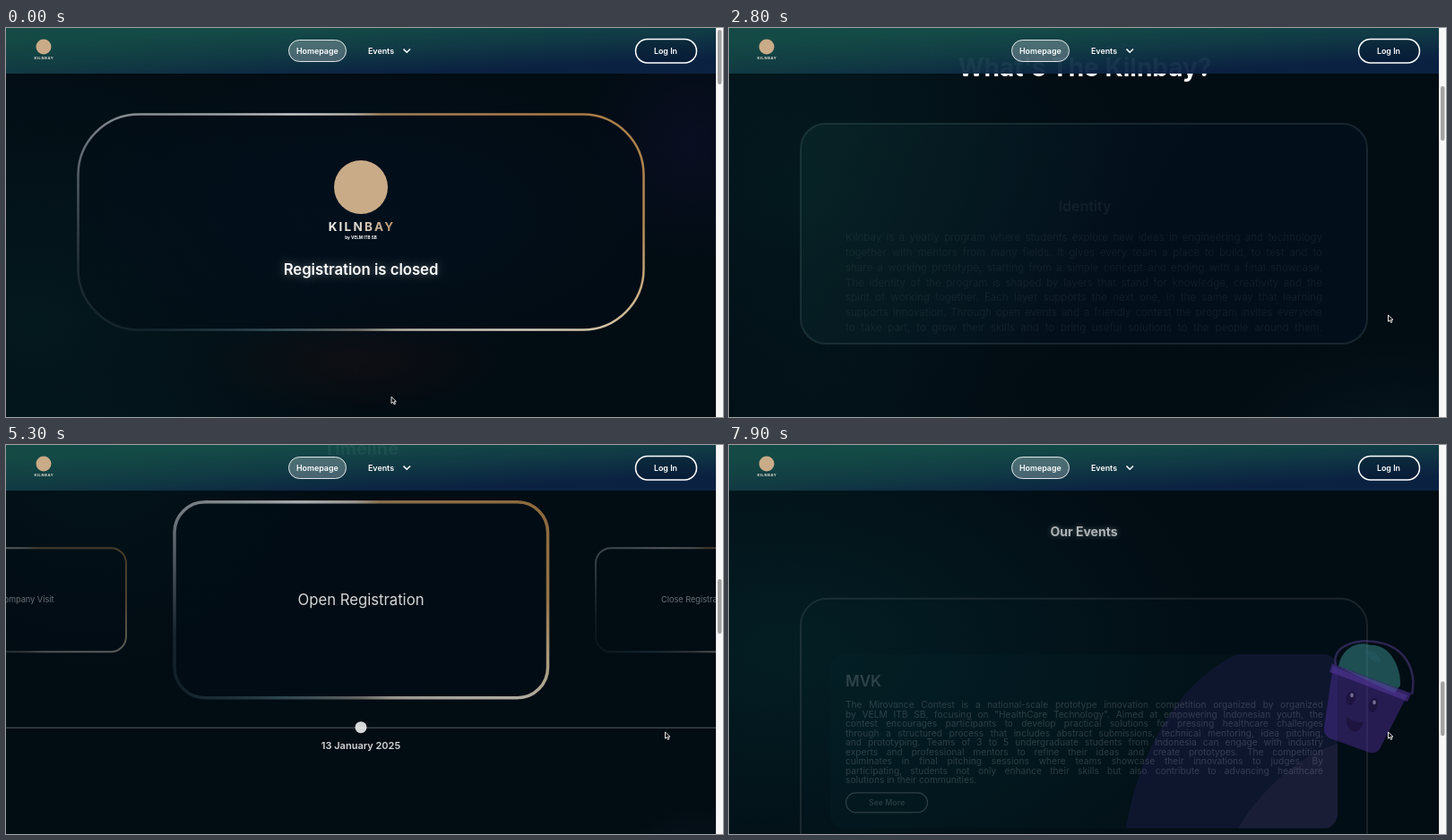
Animation, 800 px wide and 435 px high, one loop 8 s. Source, as an HTML page with a canvas:

```html
<!DOCTYPE html>
<html lang="en">
<head>
<meta charset="utf-8">
<title>Kilnbay</title>
<style>
html, body { margin: 0; width: 100%; height: 100%; overflow: hidden; background: #020c13; }
canvas { display: block; width: 800px; height: 435px; }
</style>
</head>
<body>
<canvas id="stage" width="800" height="435"></canvas>
<script>
const ctx = document.getElementById('stage').getContext('2d');
const LOOP = 8000, STEP = 100, PAGE_W = 792, MID = 396;
const GOLD = '#c9ab88', WHITE = '#fff';

// [time, scroll offset]
const SCROLL = [[0, 0], [200, 5], [1200, 85.5], [2000, 250], [2800, 447], [3400, 520], [4400, 810],
  [5200, 1040], [6000, 1108], [6600, 1512], [7000, 1575], [7700, 1855], [8000, 1862]];

const clamp = (v, a = 0, b = 1) => Math.min(b, Math.max(a, v));
const fade = (t, a, b) => clamp((t - a) / (b - a));
const ease = p => p * p * (3 - 2 * p);

// Monotone cubic through the scroll points
const slope = i => (SCROLL[i + 1][1] - SCROLL[i][1]) / (SCROLL[i + 1][0] - SCROLL[i][0]);
function tangent(i) {
  if (i === 0 || i === SCROLL.length - 1) return 0;
  const a = slope(i - 1), b = slope(i);
  return a * b > 0 ? 2 * a * b / (a + b) : 0;
}
function scrollAt(t) {
  let i = 0;
  while (i < SCROLL.length - 2 && t >= SCROLL[i + 1][0]) i++;
  const [t0, s0] = SCROLL[i], [t1, s1] = SCROLL[i + 1];
  const d = t1 - t0, u = (t - t0) / d, v = 1 - u;
  return s0 * (1 + 2 * u) * v * v + s1 * u * u * (3 - 2 * u) +
    d * (tangent(i) * u * v * v - tangent(i + 1) * u * u * v);
}

function group(alpha, draw) {
  if (alpha <= 0) return;
  ctx.save();
  ctx.globalAlpha *= alpha;
  draw();
  ctx.restore();
}
function text(s, x, y, size, weight = 600, color = WHITE, align = 'center', spacing = 0) {
  ctx.font = `${weight} ${size}px Inter, "Open Sans", sans-serif`;
  ctx.letterSpacing = spacing + 'px';
  ctx.textAlign = align;
  ctx.fillStyle = color;
  ctx.fillText(s, x, y + size * 0.36);
  ctx.letterSpacing = '0px';
}
function justify(s, x, y, w, size, weight, color) {
  ctx.font = `${weight} ${size}px Inter, "Open Sans", sans-serif`;
  const words = s.split(' ');
  const used = words.reduce((sum, word) => sum + ctx.measureText(word).width, 0);
  const gap = (w - used) / (words.length - 1);
  for (const word of words) {
    text(word, x, y, size, weight, color, 'left');
    x += ctx.measureText(word).width + gap;
  }
}
function box(x, y, w, h, r, fill, stroke, lw = 1) {
  ctx.beginPath();
  ctx.roundRect(x, y, w, h, r);
  if (fill) { ctx.fillStyle = fill; ctx.fill(); }
  if (stroke) { ctx.strokeStyle = stroke; ctx.lineWidth = lw; ctx.stroke(); }
}
function rect(x, y, w, h, color) {
  ctx.fillStyle = color;
  ctx.fillRect(x, y, w, h);
}
function oval(x, y, rx, ry, color, turn = 0) {
  ctx.beginPath();
  ctx.ellipse(x, y, rx, ry, turn, 0, 7);
  ctx.fillStyle = color;
  ctx.fill();
}
function path(d, fill, stroke, lw = 1) {
  const p = new Path2D(d);
  if (fill) { ctx.fillStyle = fill; ctx.fill(p); }
  if (stroke) { ctx.strokeStyle = stroke; ctx.lineWidth = lw; ctx.stroke(p); }
}
function linear(x0, y0, x1, y1, ...colors) {
  const g = ctx.createLinearGradient(x0, y0, x1, y1);
  colors.forEach((c, i) => g.addColorStop(i / (colors.length - 1), c));
  return g;
}
function glow(x, y, rx, ry, rgb, alpha) {
  ctx.save();
  ctx.translate(x, y);
  ctx.scale(1, ry / rx);
  const g = ctx.createRadialGradient(0, 0, 0, 0, 0, rx);
  g.addColorStop(0, `rgba(${rgb},${alpha})`);
  g.addColorStop(1, `rgba(${rgb},0)`);
  ctx.fillStyle = g;
  ctx.fillRect(-rx, -rx, rx * 2, rx * 2);
  ctx.restore();
}
function metalCard(x, y, w, h, r, lw) {
  const g = ctx.createConicGradient(0, x + w / 2, y + h / 2);
  [[0, '#b28a54'], [0.05, '#cdb891'], [0.09, '#d2cdbf'], [0.2, '#b5b1a6'], [0.25, '#77756f'],
    [0.36, '#35505b'], [0.43, '#14232b'], [0.47, '#1d2a32'], [0.52, '#4e5860'], [0.57, '#858d92'],
    [0.66, '#c6cbcc'], [0.74, '#b5b0a6'], [0.78, '#a08159'], [0.93, '#a87c46'], [1, '#b28a54']]
    .forEach(([p, c]) => g.addColorStop(p, c));
  box(x, y, w, h, r, 'rgba(2,12,22,.5)', g, lw);
}

function background() {
  rect(0, 0, 800, 1900 + 435, '#020c13');
  glow(30, 330, 380, 330, '6,40,42', 0.45);
  glow(390, 372, 170, 60, '38,18,18', 0.35);
  glow(765, 130, 120, 130, '20,16,52', 0.45);
  glow(396, 210, 340, 160, '5,26,46', 0.6);
  glow(80, 640, 380, 260, '5,42,44', 0.4);
  glow(740, 930, 190, 130, '12,40,46', 0.4);
  glow(100, 1000, 260, 300, '5,36,40', 0.4);
  glow(770, 1545, 90, 90, '18,38,48', 0.5);
  glow(790, 1720, 110, 150, '18,24,56', 0.45);
  glow(40, 1760, 300, 200, '5,36,38', 0.35);
  glow(60, 2090, 480, 300, '5,48,52', 0.5);
}

function hero() {
  metalCard(80.5, 96.5, 631, 241, 68, 2.5);
  oval(MID, 178, 30, 30, GOLD);
  text('KILNBAY', 397, 222.5, 13.5, 700, linear(358, 0, 435, 0, '#f6f2ee', '#ded3c6', '#b18e66'), 'center', 2.2);
  text('by VELM ITB SB', MID, 234, 4.6, 700);
  group(1, () => {
    ctx.shadowColor = 'rgba(255,255,255,.35)';
    ctx.shadowBlur = 8;
    text('Registration is closed', MID, 269.5, 16.7);
  });
}

const ABOUT = [
  'Kilnbay is a yearly program where students explore new ideas in engineering and technology',
  'together with mentors from many fields. It gives every team a place to build, to test and to',
  'share a working prototype, starting from a simple concept and ending with a final showcase.',
  'The identity of the program is shaped by layers that stand for knowledge, creativity and the',
  'spirit of working together. Each layer supports the next one, in the same way that learning',
  'supports innovation. Through open events and a friendly contest the program invites everyone',
  'to take part, to grow their skills and to bring useful solutions to the people around them.'];

function about(t) {
  group(fade(t, 2200, 2700), () => text("What's The Kilnbay?", 397, 44, 28, 700));
  group(fade(t, 2600, 3000), () => {
    box(80, 107, 632, 246, 28, linear(80, 107, 420, 300, 'rgba(14,54,52,.75)', 'rgba(4,18,40,.75)'),
      'rgba(150,180,190,.28)', 2);
  });
  group(fade(t, 2770, 3270), () => {
    text('Identity', 397, 199, 16);
    ABOUT.forEach((line, i) => justify(line, 130, 234 + i * 16.8, 532, 11.5, 400, WHITE));
  });
}

function stats(t) {
  group(fade(t, 3700, 4150), () => {
    group(1, () => {
      ctx.shadowColor = 'rgba(110,80,210,.6)';
      ctx.shadowBlur = 14;
      text('50.000.000++', MID, 74, 34, 700, linear(278, 0, 514, 0, '#8263e0', '#6b52bd', '#55448f'));
    });
    text('Prize pool', MID, 111.5, 13);
  });
  group(fade(t, 4000, 4730), () => {
    ['Star from', 'Kilnbay 1.0', 'Feedback'].forEach((s, i) => text(s, 152, 48 + i * 19, 13));
    ['Teams involved', 'in kilnbay 1.0'].forEach((s, i) => text(s, 640, 48 + i * 19, 13));
  });
  group(fade(t, 4370, 4800), () => text('Timeline', MID, 245, 20, 700));
}

function timeline(t) {
  group(fade(t, 4800, 5400), () => {
    group(0.5, () => {
      metalCard(-88, 58.5, 222, 116, 17, 2);
      metalCard(658, 58.5, 222, 116, 17, 2);
      text('Company Visit', 53.5, 116.5, 9.2, 400, WHITE, 'right');
      text('Close Registration', 731, 116.5, 9.2, 400, WHITE, 'left');
    });
    metalCard(188, 7, 416.5, 219, 34, 3.5);
    text('Open Registration', MID, 116.5, 16.7, 400);
    rect(0, 259, PAGE_W, 1, 'rgba(255,255,255,.4)');
    oval(MID, 259, 6.5, 6.5, WHITE);
    text('13 January 2025', MID, 279, 11);
  });
  group(fade(t, 5450, 5850), () => text('Newsletter', MID, 409, 20, 700));
}

function tank() {
  rect(0, 0, 180, 101, '#3d332d');
  rect(0, 0, 78, 8, '#6d5444');
  rect(0, 25, 84, 4, '#9a8470');
  rect(24, 10, 18, 15, '#57504a');
  rect(0, 38, 16, 34, '#8f8a83');
  rect(15, 38, 60, 39, '#25272a');
  rect(18, 41, 54, 31, '#dfe8ec');
  rect(0, 75, 84, 26, '#77716a');
  path('M4 84L60 76L66 90L14 97Z', '#2c2e31');
  rect(80, 0, 100, 101, '#8d928e');
  path('M88 4L172 2L176 32Q130 40 82 36Z', '#6c736f');
  path('M82 39H178V84Q174 96 154 96H118Q86 92 82 39Z', '#1e5527');
  rect(78, 8, 3, 60, '#1c1e20');
  path('M48 30Q82 -8 100 30M60 20Q96 10 86 60', null, '#17191b', 1.5);
}
function machine() {
  rect(0, 0, 180, 101, '#080a18');
  rect(21, 0, 139, 101, '#70594a');
  rect(21, 0, 22, 25, '#8d382f');
  rect(78, 0, 82, 22, '#5d4638');
  rect(100, 12, 30, 8, '#a83d31');
  rect(21, 58, 18, 43, '#4d433b');
  path('M38 26L52 13L142 34L136 56L40 32Z', '#e4e4df');
  path('M37 30L88 46V101H37Z', '#a5a7a6');
  path('M88 45L160 54V101H88Z', '#30363a');
  path('M92 52L152 60V88L92 84Z', '#3d4449');
  for (let i = 0; i < 5; i++) oval(76 + i * 11, 15 + (i % 2) * 5, 7, 6, '#d9dcda');
  oval(108, 33, 3, 3, '#3057b5');
  oval(117, 36, 3, 3, '#c33227');
  oval(124, 38, 3, 3, '#c33227');
  rect(160, 0, 20, 101, '#29299c');
}
function chairs() {
  rect(0, 0, 180, 101, '#e2d6c2');
  rect(0, 0, 88, 28, '#69412c');
  rect(18, 0, 20, 52, '#f1e8d6');
  rect(0, 66, 180, 35, '#8a573a');
  path('M42 66L50 40L58 66L62 82H40Z', '#c9cac7');
  path('M92 0H116L108 62M128 0H160L176 58', '#f5efe3', '#3d302a', 1.5);
  oval(112, 24, 20, 18, '#e6e6cb');
  oval(154, 26, 20, 22, '#f3ecdf');
  oval(24, 80, 28, 15, '#d6c3a5');
  oval(92, 80, 27, 15, '#dfd9b5');
  oval(153, 74, 27, 18, '#d9c7a8');
  path('M0 54Q60 62 180 55V62Q60 69 0 61Z', '#f6f5f1');
}

const POSTS = [
  [96, tank, '2025-02-09', ['OLVAN: Unlocking the Future', 'of Biocarbon Innovation']],
  [306, machine, '2025-02-05', ['TAVRI: Hysteresis Dynamic', 'Response Adapter in', 'Bidirectional VSI for', 'Renewable Integration']],
  [516, chairs, '2025-02-02', ['SolvenQ: Pioneering Energy', 'Efficiency Through Reduced', 'Heat Demand']]];

function news(t) {
  group(fade(t, 6150, 6500), () => {
    for (const [x, photo, date, title] of POSTS) {
      group(1, () => {
        ctx.translate(x, 68);
        ctx.beginPath();
        ctx.roundRect(0, 0, 180, 101, 3);
        ctx.clip();
        photo();
      });
      text(`By Tamrin Wulakerta Oban,  ${date}`, x, 181, 8.1, 400, '#f4f6f7', 'left');
      title.forEach((line, i) => text(line, x, 198.5 + i * 17, 13, 600, WHITE, 'left'));
    }
    path('M104 295.5H97M100.5 292L97 295.5L100.5 299M688 295.5H695M691.5 292L695 295.5L691.5 299', null, WHITE, 1.1);
    text('Previous', 108, 295.5, 8.6, 500, WHITE, 'left');
    text('Next', 684.5, 295.5, 8.6, 500, WHITE, 'right');
    box(386, 287, 15.5, 17, 2, '#0d1826');
    text('1', 393.5, 295.5, 8.6, 500);
    text('2', 414, 295.5, 8.6, 500);
  });
}

const EVENT = [
  'The Mirovance Contest is a national-scale prototype innovation competition organized by organized',
  'by VELM ITB SB, focusing on "HealthCare Technology". Aimed at empowering Indonesian youth, the',
  'contest encourages participants to develop practical solutions for pressing healthcare challenges',
  'through a structured process that includes abstract submissions, technical mentoring, idea pitching,',
  'and prototyping. Teams of 3 to 5 undergraduate students from Indonesia can engage with industry',
  'experts and professional mentors to refine their ideas and create prototypes. The competition',
  'culminates in final pitching sessions where teams showcase their innovations to judges. By',
  'participating, students not only enhance their skills but also contribute to advancing healthcare'];

function bucket() {
  path('M677 247C672 226 700 217 725 222C752 227 768 250 762 280', null, '#54408f', 2.5);
  path('M680 249C684 226 704 220 716 225C738 224 750 250 749 270L742 279Z', '#3b8f8f');
  path('M708 232Q722 228 728 243Q718 247 708 232Z', '#235c66');
  path('M674 249L757 281L726 341Q722 347 714 345L670 329Q663 325 664 317Z', '#4a2c92');
  path('M673 246L761 279L757 288L670 255Z', '#5b3aa6', '#2c1a5c', 1);
  oval(694, 284, 5, 8, '#140c2c', 0.3);
  oval(719, 292, 5, 8, '#140c2c', 0.3);
  oval(695, 281, 1.8, 2.5, '#cfc6ea');
  oval(720, 289, 1.8, 2.5, '#cfc6ea');
  path('M689 305Q698 313 708 311Q704 324 695 321Q688 316 689 305Z', '#140c2c');
}

function events(t) {
  group(fade(t, 7640, 8040), () => {
    ctx.shadowColor = 'rgba(255,255,255,.5)';
    ctx.shadowBlur = 6;
    text('Our Events', MID, 98, 14, 700);
  });
  group(fade(t, 7700, 8900), () => {
    box(80, 173, 632, 330, 30, 'rgba(8,40,52,.5)', '#8d9596', 2);
    group(1, () => {
      ctx.beginPath();
      ctx.roundRect(113, 235, 566, 195, 16);
      ctx.clip();
      rect(113, 235, 566, 195, '#0a2a34');
      path('M443 430C455 350 500 265 568 235H679V430Z', '#4a2596');
      path('M568 430C595 385 635 350 679 335V430Z', '#4c4660');
    });
    text('MVK', 130, 265, 17, 600, WHITE, 'left');
    EVENT.forEach((line, i) => justify(line, 130, 291.5 + i * 10.5, 533, 10.2, 400, WHITE));
    text('solutions in their communities.', 130, 375.5, 10.2, 400, WHITE, 'left');
    box(130.5, 390, 91, 22, 11, null, WHITE, 1.2);
    text('See More', 176, 401, 8.8, 500);
  });
  group(fade(t, 7600, 8200), bucket);
}

function nav() {
  group(0.96, () => {
    rect(0, 0, PAGE_W, 51, linear(395, -6, 398, 54, '#15504a', '#113c47', '#0b2243'));
    rect(0, 0, PAGE_W, 51, linear(0, 0, 360, 0, 'rgba(20,66,62,.35)', 'rgba(20,66,62,0)'));
  });
  oval(42, 21, 8.5, 8.5, GOLD);
  text('KILNBAY', 42.3, 33.5, 4, 700, '#e9e1d8', 'center', 0.6);
  box(315.5, 13.5, 64, 24, 12, 'rgba(255,255,255,.24)', 'rgba(255,255,255,.85)');
  text('Homepage', 347.3, 25.5, 8.9);
  text('Events', 404, 25.5, 8.9, 600, WHITE, 'left');
  path('M443.5 23.5L447.2 27.2L451 23.5', null, WHITE, 1.6);
  box(702.5, 12.5, 68, 26.5, 13.25, 'rgba(3,18,38,.3)', WHITE, 1.5);
  text('Log In', 736, 25.5, 8.9);
}

function scrollbar(s) {
  rect(PAGE_W, 0, 8, 435, '#f8f8f8');
  rect(PAGE_W, 0, 1, 435, '#e2e2e2');
  box(794, 2 + s / 7.1, 4.5, 61, 2.25, '#a3a3a3');
}

function cursor(t) {
  const p = ease(fade(t, 1900, 2700));
  group(1, () => {
    ctx.translate(430 + 305.5 * p, 412.5 - 91.5 * p);
    ctx.lineJoin = 'round';
    if (t >= 4100 && t < 4700) {
      path('M-1 1Q0 -0.5 1 1V4L4 5V8L3 9H0L-2.5 5.5L-1 6Z', WHITE, '#101010', 0.6);
    } else {
      path('M0 0V7.2L1.8 5.7L3 8.4L4.4 7.8L3.2 5.2H5.4Z', '#080808', WHITE, 0.9);
    }
  });
}

// [scroll offset the section is laid out at, painter]
const SECTIONS = [[0, hero], [447, about], [810, stats], [1108, timeline], [1512, news], [1860, events]];

function render(t) {
  const s = scrollAt(t);
  group(1, () => {
    ctx.translate(0, -s);
    background();
  });
  for (const [top, draw] of SECTIONS) {
    group(1, () => {
      ctx.translate(0, top - s);
      draw(t);
    });
  }
  nav();
  scrollbar(s);
  cursor(t);
}

const start = performance.now();
function tick() {
  const t = (performance.now() - start + 10) % LOOP;
  render(Math.floor(t / STEP) * STEP);
  requestAnimationFrame(tick);
}
tick();
</script>
</body>
</html>
```
